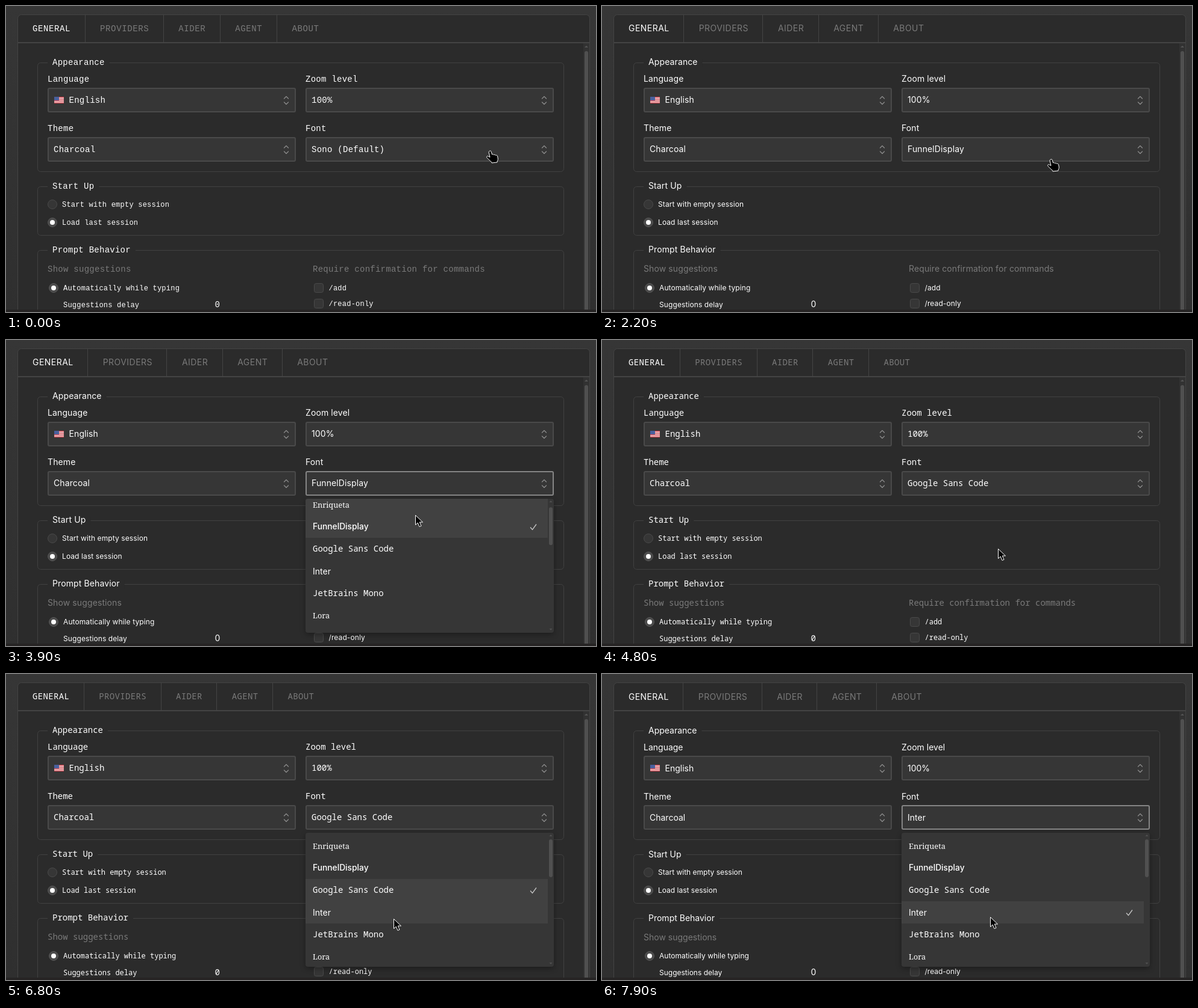
These frames come from a looping animation (979x509 px, 8000 ms). An HTML page:

```html
<!DOCTYPE html>
<html lang="en">
<head>
<meta charset="utf-8">
<title>Font settings</title>
<style>
html, body { margin: 0; width: 100%; height: 100%; overflow: hidden; background: #303030; }
svg { display: block; width: 979px; height: 509px; }
text { fill: #fff; white-space: pre; }
text.dim { fill: #7a7a7a; }
.frame { fill: none; stroke: #414141; }
.field { fill: #363636; stroke: #4a4a4a; stroke-width: 2; }
.field.focus { stroke: #858585; }
.control { fill: #363636; stroke: #4a4a4a; }
.on { fill: #4a4a4a; stroke: #555; }
.chevron { fill: none; stroke: #8a8a8a; stroke-width: 1.3; stroke-linecap: round; stroke-linejoin: round; }
.lit { fill: #414141; }
#menu { filter: drop-shadow(0 3px 4px #0005); }
</style>
</head>
<body>
<svg id="stage" viewBox="0 0 979 509">
  <defs>
    <linearGradient id="wall" x2="0" y2="1"><stop stop-color="#363636"/><stop offset="1" stop-color="#2f2f2f"/></linearGradient>
    <clipPath id="menuClip"><rect x="497" y="264" width="412" height="223" rx="4"/></clipPath>
  </defs>
  <rect width="979" height="509" fill="url(#wall)"/>
  <rect x="19.5" y="14.5" width="949" height="520" rx="6" fill="#2b2b2b" stroke="#444"/>
  <path d="M20 61H968" stroke="#444" stroke-width="2"/>
  <rect x="958" y="62" width="10" height="447" fill="#323232"/>
  <path d="M960 69l3-3 3 3z" fill="#555"/>
  <rect x="960" y="75" width="6" height="450" rx="3" fill="#505050"/>
  <g id="base"></g>
  <g id="pages"></g>
  <rect y="505" width="979" height="4" fill="#262424"/>
  <g id="menu">
    <rect x="497" y="264" width="412" height="223" rx="4" fill="#363636"/>
    <g clip-path="url(#menuClip)">
      <g id="list">
        <rect id="hover" class="lit" x="497" width="402" height="37"/>
        <g id="chosen">
          <rect class="lit" x="497" width="402" height="37"/>
          <path d="M870 19.5l3.5 4 6.5-9" fill="none" stroke="#c4c4c4" stroke-width="1.3"/>
        </g>
      </g>
    </g>
    <path d="M901.5 270l2.5-3 2.5 3zM901.5 480l2.5 3 2.5-3z" fill="#505050"/>
    <rect id="thumb" x="901" y="275" width="6" height="63" rx="3" fill="#505050"/>
  </g>
  <g id="cursor" fill="#000" stroke="#fff" stroke-linejoin="round">
    <path id="arrow" d="M.5.5V16.5L4.3 13.1 7 19.6 10 18.3 7.300 12H12.500Z"/>
    <path id="hand" d="M0 .5C1.500-.5 3 0 3.300 1.500L4.500 6C5.500 5.300 7 5.600 7.400 6.600 8.500 5.900 10 6.300 10.400 7.400 11.800 6.800 13.300 7.400 13.600 8.800L14.300 13C14.500 15 13.500 16.500 13 18V19L4 20 3.600 18.500C1.500 17-1 14.500-4 11.300-5 10-4 8.300-2.300 8.800L1 10.500-.7 3C-1 1.800-.8 1 0 .5Z"/>
  </g>
</svg>
<script>
const LOOP = 8000, FRAME = 100, ROW = 37, LIST_TOP = 267;
const $ = id => document.getElementById(id);

function add(parent, tag, attrs, content = '') {
  const node = document.createElementNS('http://www.w3.org/2000/svg', tag);
  for (const key in attrs) node.setAttribute(key, attrs[key]);
  node.textContent = content;
  parent.append(node);
  return node;
}

// Spacing is in em; drop shifts the regular-size baseline.
const MONO = '"Noto Sans Mono", monospace', SANS = 'Inter, sans-serif', SERIF = '"Noto Serif", serif';
const faces = [
  { name: 'Sono (Default)', family: '"Liberation Mono", monospace', spacing: .0187, drop: 0 },
  { name: 'FunnelDisplay', family: SANS, spacing: .008, drop: 0 },
  { name: 'Google Sans Code', family: MONO, spacing: 0, drop: 0 },
  { name: 'Inter', family: SANS, spacing: 0, drop: 1 },
];

function buildBase() {
  const base = $('base');
  for (const [y, h] of [[94.5, 181], [300.5, 81], [406.5, 140]])
    add(base, 'rect', { class: 'frame', x: 52.5, y, width: 873, height: h, rx: 5 });
  for (const [x, y] of [[70, 137], [498, 137], [70, 219], [498, 219]]) {
    const field = add(base, 'rect', { class: 'field', x, y, width: 410, height: 39, rx: 2 });
    if (x > 400 && y > 200) field.id = 'fontField';
    add(base, 'path', { class: 'chevron', d: `M${x + 391.5} ${y + 17}l3.500-3.500 3.500 3.500m-7 6l3.500 3.500 3.500-3.500` });
  }
  for (const [x, y, on] of [[77, 330, 0], [77, 360, 1], [79, 469, 1]]) {
    add(base, 'circle', { class: on ? 'on' : 'control', cx: x, cy: y, r: 7.5 });
    if (on) add(base, 'circle', { cx: x, cy: y, r: 4, fill: '#fff' });
  }
  for (const y of [461.5, 487.5])
    add(base, 'rect', { class: 'control', x: 511.5, y, width: 15, height: 15, rx: 3 });
  add(base, 'rect', { x: 80, y: 151, width: 16, height: 11, rx: 1, fill: '#eee' });
  for (let i = 0; i < 4; i++)
    add(base, 'rect', { x: 80, y: 151 + i * 3.1, width: 16, height: 1.6, fill: '#d8434e' });
  add(base, 'rect', { x: 80, y: 151, width: 8, height: 6, fill: '#4a5f9c' });
}

function buildPage(face) {
  const page = add($('pages'), 'g', { 'font-family': face.family });
  const write = (x, y, content, size = 14, cls = '', extra = 0) => add(page, 'text', {
    x, y: y + (size === 14 ? face.drop : 0), class: cls, 'font-size': size,
    'letter-spacing': (face.spacing + extra) * size,
  }, content);

  let x = 44;
  ['GENERAL', 'PROVIDERS', 'AIDER', 'AGENT', 'ABOUT'].forEach((tab, i) => {
    const label = write(x, 42, tab, 14, i ? 'dim' : '', .025);
    x += label.getComputedTextLength() + 24;
    if (i < 4) add(page, 'path', { d: `M${Math.floor(x) + .5} 15V60`, stroke: '#444' });
    x += 25;
  });
  for (const [y, title] of [[98, 'Appearance'], [304, 'Start Up'], [410, 'Prompt Behavior']]) {
    const label = write(77, y, title);
    const gap = add(page, 'rect', { x: 69, y: y - 10, width: label.getComputedTextLength() + 16, height: 14, fill: '#2b2b2b' });
    page.insertBefore(gap, label);
  }
  write(69, 126, 'Language');
  write(497, 126, 'Zoom level');
  write(104.5, 161, 'English');
  write(507, 161, '100%');
  write(69, 208, 'Theme');
  write(497, 208, 'Font');
  write(79, 243, 'Charcoal');
  write(507, 243, face.name);
  write(93, 334, 'Start with empty session', 12);
  write(93, 364, 'Load last session', 12);
  write(69, 442, 'Show suggestions', 14, 'dim');
  write(509, 442, 'Require confirmation for commands', 14, 'dim');
  write(95, 473, 'Automatically while typing', 12);
  write(95, 501, 'Suggestions delay', 12);
  write(346.5, 501 - face.drop, '0');
  write(535.5, 473, '/add', 12);
  write(535.5, 499, '/read-only', 12);
  return page;
}

function buildList() {
  const rows = [
    ['Enriqueta', 291, SERIF, 12.8, 400], ['FunnelDisplay', 327, SANS, 13.8, 500],
    ['Google Sans Code', 364, MONO, 14, 400], ['Inter', 402, SANS, 14, 400],
    ['JetBrains Mono', 438, MONO, 14, 500], ['Lora', 475, SERIF, 12.7, 400],
  ];
  for (const [name, y, family, size, weight] of rows)
    add($('list'), 'text', { x: 509, y, 'font-family': family, 'font-size': size, 'font-weight': weight }, name);
}

const faceSteps = [[0, 0], [1800, 1], [4700, 2], [6900, 3]];
const openSpans = [[300, 1800], [2700, 4700], [5500, 6900], [7400, 9000]];
const focusSpans = [[300, 1600], [2700, 4500], [5500, 6600], [7400, 9000]];
const scrollPath = [[3600, 0], [3900, 12], [4100, 0]];
const cursorPath = [
  [0, 802, 241], [100, 787, 237], [600, 787, 237], [800, 764, 266], [1000, 743, 296],
  [1100, 743, 296], [1300, 743, 319], [1800, 743, 319], [2200, 744, 255], [2300, 744, 255],
  [2500, 745, 243], [3000, 745, 243], [3300, 708, 270], [3900, 679, 291], [4400, 657, 347],
  [4800, 657, 347], [5200, 669, 247], [5600, 669, 247], [5900, 658, 335], [6200, 643, 407],
  [6900, 643, 407], [7200, 669, 247], [7500, 672, 250], [7600, 675, 286], [7900, 644, 404],
];

// Linear interpolation of [time, ...values] rows, held at both ends.
function sample(path, t) {
  const next = path.findIndex(p => p[0] > t);
  if (next < 0) return path[path.length - 1].slice(1);
  if (next === 0) return path[0].slice(1);
  const a = path[next - 1], b = path[next], k = (t - a[0]) / (b[0] - a[0]);
  return a.slice(1).map((v, i) => v + (b[i + 1] - v) * k);
}

function menuOpacity(t) {
  for (const [start, end] of openSpans) {
    if (t >= start && t < end) return t < start + FRAME ? .6 : 1;
    if (t >= end && t < end + FRAME) return .4;
  }
  return 0;
}

const show = (node, visible) => { node.style.display = visible ? '' : 'none'; };

buildBase();
buildList();
const pages = faces.map(buildPage);

function draw(now) {
  const t = Math.floor((now % LOOP) / FRAME) * FRAME;
  const current = faceSteps.filter(s => s[0] <= t).pop()[1];
  pages.forEach((page, i) => show(page, i === current));
  $('fontField').classList.toggle('focus', focusSpans.some(([a, b]) => t >= a && t < b));

  const [scroll] = sample(scrollPath, t);
  const [x, y] = sample(cursorPath, t);
  $('menu').style.opacity = menuOpacity(t);
  $('list').setAttribute('transform', `translate(0 ${-scroll})`);
  $('thumb').setAttribute('y', 275 + scroll * .28);
  const row = Math.floor((y + scroll - LIST_TOP) / ROW);
  show($('hover'), y > 264 && row >= 0);
  $('hover').setAttribute('y', LIST_TOP + row * ROW);
  show($('chosen'), current > 0);
  $('chosen').setAttribute('transform', `translate(0 ${LIST_TOP + current * ROW})`);

  $('cursor').setAttribute('transform', `translate(${Math.round(x)} ${Math.round(y)})`);
  const onField = y < 260;
  show($('hand'), onField);
  show($('arrow'), !onField);
}

const begin = performance.now();
function tick() {
  draw(performance.now() - begin);
  requestAnimationFrame(tick);
}
tick();
</script>
</body>
</html>
```
